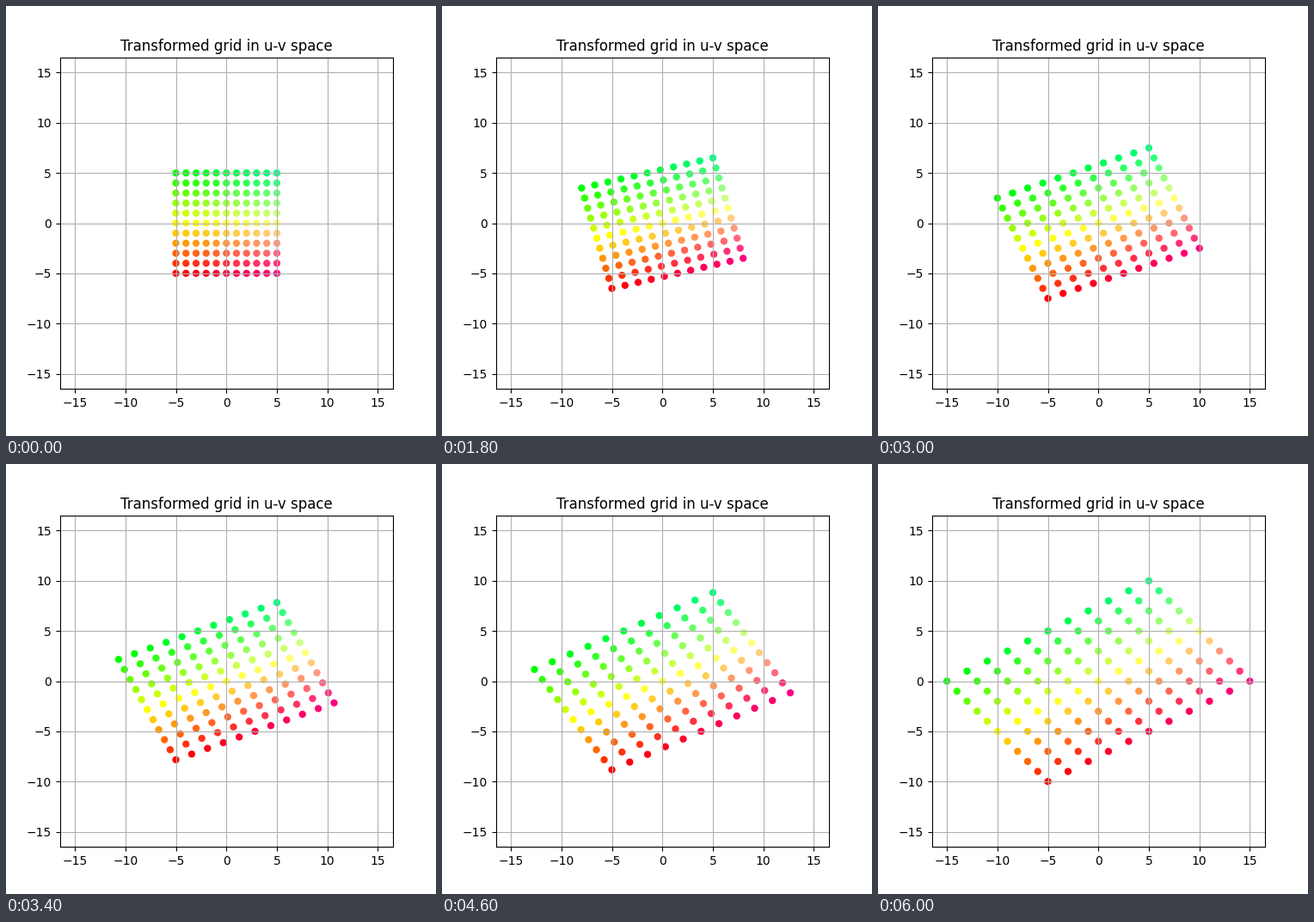
A matplotlib script that plays this animation: 500 px wide and 500 px high, repeating every 6.2 s.

```python
import numpy as np
import matplotlib.pyplot as plt
from matplotlib.animation import FuncAnimation

STEPS = 30
HALF = 5
LIMIT = 16.5
MATRIX = np.array([[2, -1], [1, 1]])


def color(x, y):
    """Red to green along y, with more blue towards the right."""
    return min(1, 1 - y / HALF), min(1, 1 + y / HALF), 1 / 4 + x / 20


def transform(step):
    """Linear blend from the identity to the full matrix."""
    eye = np.eye(2)
    return eye + step / STEPS * (MATRIX - eye)


axis = np.linspace(-HALF, HALF, 2 * HALF + 1)
grid = np.array([(x, y) for x in axis for y in axis])
colors = [color(x, y) for x, y in grid]

fig, ax = plt.subplots(figsize=(5, 5), dpi=100)
ax.set(xlim=(-LIMIT, LIMIT), ylim=(-LIMIT, LIMIT))
ax.set_title("Transformed grid in u-v space")
ax.grid(True)
dots = ax.scatter(grid[:, 0], grid[:, 1], s=36, c=colors, edgecolor="none")


def update(step):
    dots.set_offsets(grid @ transform(step).T)
    return (dots,)


anim = FuncAnimation(fig, update, frames=STEPS + 1, interval=200,
                     repeat=True, repeat_delay=0)
plt.show()
```
